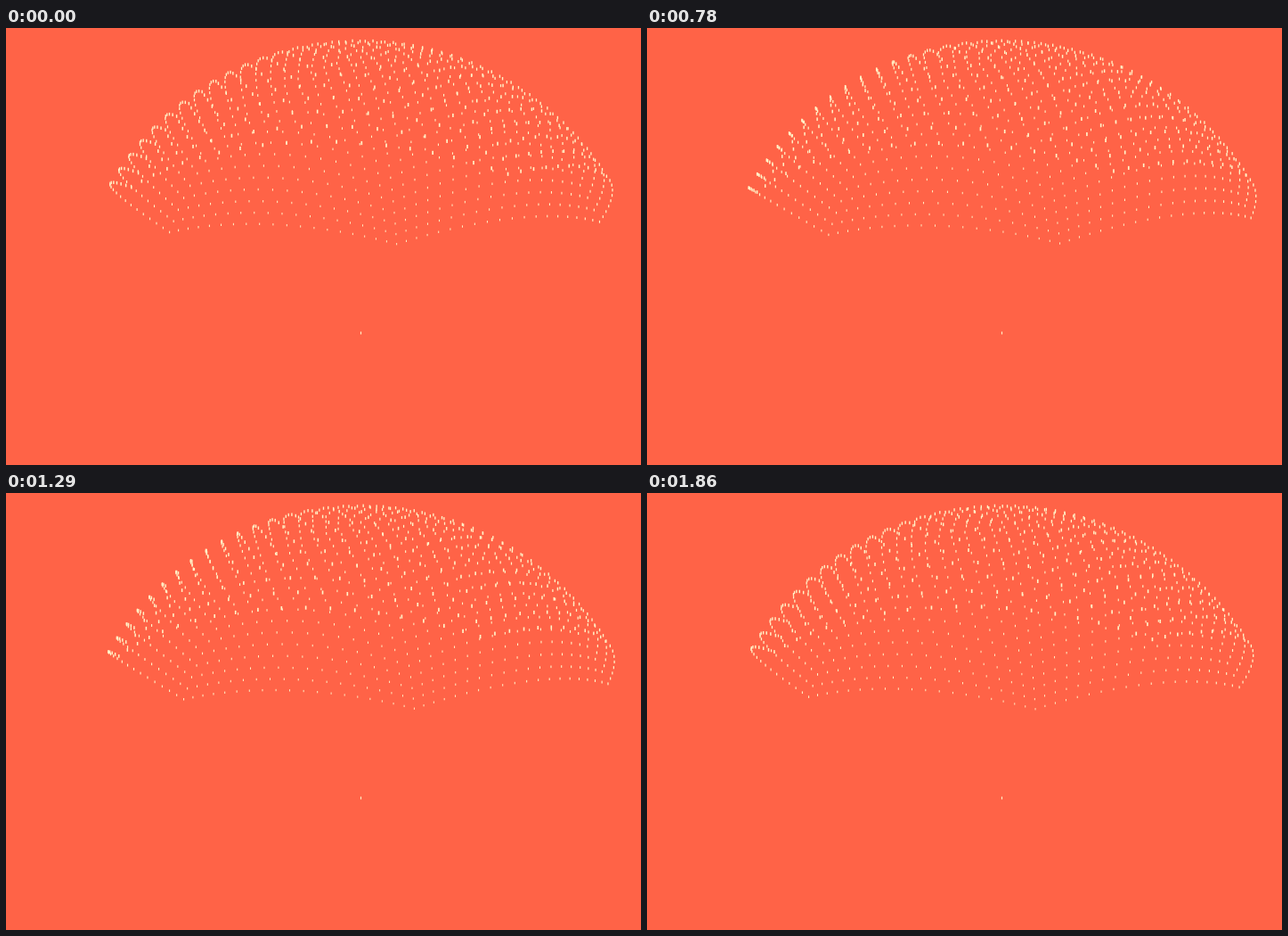
Recreate the animation shown at these times as an HTML page with a canvas. Size 713 by 490 pixels, loop 1.92 s.

```html
<!DOCTYPE html>
<html lang="en">
<head>
<meta charset="utf-8">
<title>Dotted dome</title>
<style>
  html, body { margin: 0; width: 100%; height: 100%; overflow: hidden; background: #ff6347; }
  canvas { display: block; }
</style>
</head>
<body>
<canvas id="stage" width="713" height="490"></canvas>
<script>
const ctx = document.getElementById('stage').getContext('2d');
const W = 713, H = 490, CX = 398.5, CY = 342;
const RADIUS = 309, CAMERA = 3 * RADIUS;
const RIM = 280.6, RIM_Y = 129.5, DIVISIONS = 19;
const LOOP = 1920, HOLD = 300, STEP = 30, LAST = 53;
const RAD = Math.PI / 180;

// [step, rotation in degrees]
const TURN = [[0, 10.7], [8, -15], [17, -54.6], [24, -86.7], [34, -128], [47, -183], [53, -206]];

const corner = k => {
  const a = k * 72 * RAD;
  return [RIM * Math.sin(a), RIM_Y, RIM * Math.cos(a)];
};

// Five triangles around the apex, subdivided and pushed out to the sphere
function buildDome() {
  const dots = [[0, 0, 0], [0, RADIUS, 0]];
  for (let k = 0; k < 5; k++) {
    const a = corner(k), b = corner(k + 1);
    for (let row = 0; row < DIVISIONS; row++) {
      const count = DIVISIONS - row;
      for (let i = 0; i < count; i++) {
        const u = (count - i) / DIVISIONS, v = i / DIVISIONS, w = row / DIVISIONS;
        const x = a[0] * u + b[0] * v;
        const y = RIM_Y * (u + v) + RADIUS * w;
        const z = a[2] * u + b[2] * v;
        const s = RADIUS / Math.hypot(x, y, z);
        dots.push([x * s, y * s, z * s]);
      }
    }
  }
  return dots;
}

function angleAt(step) {
  let i = 1;
  while (TURN[i][0] < step) i++;
  const [s0, a0] = TURN[i - 1], [s1, a1] = TURN[i];
  return (a0 + (a1 - a0) * (step - s0) / (s1 - s0)) * RAD;
}

const dome = buildDome();

function draw(time) {
  const t = time % LOOP;
  const step = t < HOLD ? 0 : Math.min(LAST, Math.floor((t - HOLD) / STEP) + 1);
  const angle = angleAt(step), c = Math.cos(angle), s = Math.sin(angle);
  ctx.fillStyle = '#ff6347';
  ctx.fillRect(0, 0, W, H);
  ctx.fillStyle = '#fff3c8';
  for (const [x, y, z] of dome) {
    const scale = CAMERA / (CAMERA + z * c - x * s);
    const px = CX + (x * c + z * s) * scale;
    const py = CY - y * scale;
    const w = 1.2 * scale, h = 3 * scale;
    ctx.fillRect(px - w / 2, py - h / 2, w, h);
  }
}

const start = performance.now();
function tick() {
  draw(performance.now() - start);
  requestAnimationFrame(tick);
}
tick();
</script>
</body>
</html>
```
